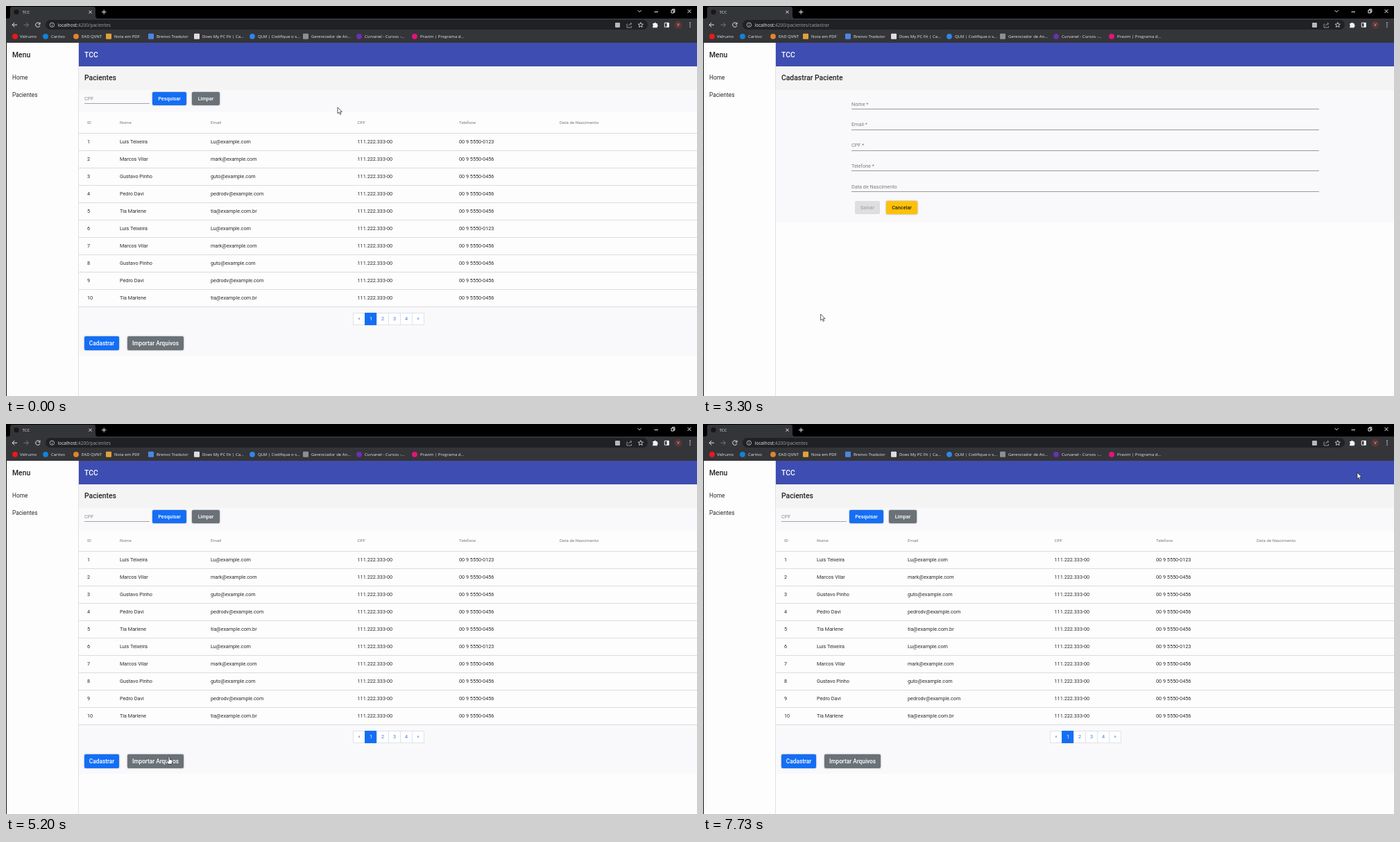
These frames come from a looping animation (996 by 562 pixels, 7900 ms). An HTML page:

```html
<!DOCTYPE html>
<html lang="pt">
<head>
<meta charset="utf-8">
<title>TCC</title>
<style>
html, body { margin: 0; width: 100%; height: 100%; overflow: hidden; background: #fdfdfd; }
svg { display: block; }
text { font-family: Roboto, sans-serif; white-space: pre; }
.ui { font-family: "Open Sans", sans-serif; }
.raised { filter: drop-shadow(0 .8px .8px rgba(0, 0, 0, .4)); }
.line { fill: none; stroke: #e8eaed; stroke-width: 1; }
</style>
</head>
<body>
<svg id="stage" width="996" height="562" viewBox="0 0 996 562"></svg>
<script>
const LOOP = 7900, LAG = 110;
const INK = '#2b2b2b', BLUE = '#146ef5', GREY = '#6a7278', CARD = '#f9f9fb';
// CSS sizes of the page, scaled to the stage
const S = { xs: 6.22, sm: 7.26, md: 8.3, lg: 10.37 };

const rect = (x, y, w, h, fill, more = '') =>
  `<rect x="${x}" y="${y}" width="${w}" height="${h}" fill="${fill}" ${more}/>`;
const dot = (x, y, r, fill) => `<circle cx="${x}" cy="${y}" r="${r}" fill="${fill}"/>`;
const path = (d, more = '') => `<path class="line" d="${d}" ${more}/>`;
const text = (x, cy, str, size, fill = INK, more = '') =>
  `<text x="${x}" y="${(cy + size * .355).toFixed(2)}" font-size="${size}" fill="${fill}" ${more}>${str}</text>`;
const ui = (x, cy, str, size, fill = '#e8eaed', more = '') =>
  text(x, cy, str, size, fill, 'class="ui" ' + more);
const rule = (x, y, w, fill = '#dcdcdf') => rect(x, y, w, 1, fill);
const MID = 'text-anchor="middle"', BOLD = 'font-weight="500"';

// Hover targets of each page
const pages = { list: [], form: [], load: [] };

function button(page, x, y, w, h, label, size, fill, hover, ink = '#fff', cls = 'raised') {
  if (hover) pages[page].push({ x, y, w, h, fill, hover, hand: true });
  const id = hover ? `id="${page}${pages[page].length - 1}"` : '';
  return `<g class="${cls}">${rect(x, y, w, h, fill, `rx="2" ${id}`)}</g>` +
    text(x + w / 2, y + h / 2 - .2, label, size, ink, `${MID} ${BOLD}`);
}

function table(page, top, cols, heads, rows) {
  let out = cols.map((x, i) => text(x, top - 15, heads[i], S.xs, '#7a7a7a')).join('');
  rows.forEach((cells, i) => {
    const y = top + i * 25;
    pages[page].push({ x: 105, y, w: 891, h: 25, fill: '#fdfdfd', hover: '#f1f1f1' });
    out += rect(105, y, 891, 25, '#fdfdfd', `id="${page}${pages[page].length - 1}"`) + rule(105, y, 891);
    out += cells.map((c, j) => text(cols[j], y + 12.2, c, S.sm)).join('');
  });
  return out + rule(105, top + rows.length * 25, 891);
}

function pager(page, x, y, labels) {
  return labels.map((s, i) => {
    const on = s === '1', px = x + i * 17;
    pages[page].push({ x: px, y, w: 17, h: 18, hand: true });
    return rect(px + .5, y + .5, 17, 17, on ? BLUE : '#fff', `stroke="${on ? BLUE : '#dee2e6'}"`) +
      text(px + 9, y + 8.5, s, S.sm, on ? '#fff' : '#3b7df0', MID);
  }).join('');
}

const header = (title, end) => rect(105, 87, 891, end - 87, CARD) +
  rect(105, 87, 891, 34, '#f4f4f4') + text(113, 103.6, title, S.lg, '#222', BOLD);

const url = tail => ui(74.5, 27.2, `localhost:<tspan fill="#9aa0a6">4200/${tail}</tspan>`, 6.6);

function browser() {
  const marks = [
    [13, 20, 'Vidrumo', '#f01818'], [57, 65, 'Cartivo', '#1283d8'],
    [101, 109, 'EAD QVNT', '#e0852c'], [148, 156, 'Nota em PDF', '#e2a03c', 1],
    [209, 217, 'Brenvo Tradutor', '#4a86e8', 1], [275, 283, 'Does My PC Fit | Ca...', '#dedede', 1],
    [355, 363, 'QLM | Codifique o s...', '#2f86eb'], [432, 440, 'Gerenciador de An...', '#8c8f94', 1],
    [509, 517, 'Curvanel - Cursos -...', '#6a2fb5'], [589, 597, 'Pravim | Programa d...', '#e6127e']
  ];
  return rect(0, 0, 996, 18, '#000') +
    `<path d="M3 18Q6 18 6 14V4Q6 1 9 1H126Q129 1 129 4V14Q129 18 132 18Z" fill="#343538"/>` +
    rect(0, 18, 996, 35, '#343538') + rect(57, 20, 868, 14, '#202124', 'rx="7"') +
    dot(15, 8.7, 3.6, '#17181a') + ui(23.5, 8.7, 'TCC', 6.1) +
    path('M119.5 6.7l4 4m0-4l-4 4M138 8.7h6.4m-3.2-3.2v6.4') +
    path('M910.7 6.2l2.5 2.5 2.5-2.5M934.5 8.5h5.5M959 6h3.5v4H959zM960.5 6V4.7h3.4V9h-1.4M982.5 5l5 5m0-5l-5 5') +
    path('M16 27.2H9m3.3-3.3L9 27.2l3.3 3.3') +
    path('M25.5 27.2h7m-3.3-3.3l3.3 3.3-3.3 3.3', 'style="stroke:#75777b"') +
    path('M48.6 25.4a3.2 3.2 0 1 0 .4 2.6M49 23.7v2.5h-2.5') +
    path('M69.6 27.2a3.2 3.2 0 1 1-6.4 0a3.2 3.2 0 1 1 6.4 0M66.4 26.8v2.3M66.4 25v.8', 'style="stroke-width:.7"') +
    rect(878, 24, 7, 7, '#b4b7bb', 'rx="1"') +
    path('M896 26h-1v5h6.5v-2M897.5 28.5q.5-3 4-3m-1.5-1.7l1.9 1.7-1.9 1.7', 'style="stroke:#a9adb2;stroke-width:.8"') +
    path('M914.8 23.6l1 2.4 2.6.2-2 1.7.7 2.6-2.3-1.4-2.3 1.4.7-2.6-2-1.7 2.6-.2z', 'style="stroke-width:.8"') +
    `<path d="M932.2 25h2a1.3 1.3 0 0 1 2.6 0h2v2a1.3 1.3 0 0 1 0 2.5v1.7h-6.6v-2a1.2 1.2 0 0 0 0-2.2z" fill="#f1f3f4"/>` +
    path('M949.3 24.3h6v6h-6z') + rect(952.5, 24, 3, 6.5, '#f1f3f4') +
    dot(969, 27.2, 5.6, '#5b3535') + ui(969, 27.2, 'V', 6, '#e5d6d6', MID) +
    [24.4, 27.2, 30].map(y => dot(986, y, .8, '#e8eaed')).join('') +
    marks.map(([x, tx, s, c, sq]) => (sq ? rect(x - 4, 39.8, 8, 8, c, 'rx="1"') : dot(x, 43.8, 3.9, c)) +
      ui(tx, 43.7, s, 6)).join('');
}

function shell() {
  return rect(0, 53, 996, 509, '#fdfdfd') + rect(0, 53, 1, 509, '#111') +
    rect(104, 53, 1, 509, '#e2e2e2') + rect(105, 53, 891, 34, '#3e4db1') +
    text(113, 70.3, 'TCC', S.lg, '#fff', BOLD) + text(9, 70.3, 'Menu', S.lg, '#222', BOLD) +
    text(9, 103.2, 'Home', S.md) + text(9, 128.2, 'Pacientes', S.md);
}

function listPage() {
  const people = [
    ['Luís Teixeira', 'Lu@example.com', '0123'], ['Marcos Vilar', 'mark@example.com', '0456'],
    ['Gustavo Pinho', 'guto@example.com', '0456'], ['Pedro Davi', 'pedrodv@example.com', '0456'],
    ['Tia Marlene', 'tia@example.com.br', '0456']
  ];
  const rows = [...people, ...people].map(([name, mail, tel], i) =>
    [i + 1, name, mail, '111.222.333-00', '00 9 5550-' + tel]);
  return url('pacientes') + header('Pacientes', 504) +
    text(113, 133, 'CPF', S.sm, '#8f8f8f') + rule(113, 140, 94, '#a5a5a5') +
    button('list', 211, 124, 49, 19, 'Pesquisar', S.sm, BLUE, '#0b5ed7') +
    button('list', 268, 124, 40, 19, 'Limpar', S.sm, GREY, '#5c636a') +
    rect(105, 153, 891, 30, '#fdfdfd') +
    table('list', 183, [117, 164, 295, 506.5, 653, 798],
      ['ID', 'Nome', 'Email', 'CPF', 'Telefone', 'Data de Nascimento'], rows) +
    pager('list', 500, 442, ['«', '1', '2', '3', '4', '»']) +
    button('list', 113, 476, 50, 20, 'Cadastrar', S.md, BLUE, '#0b5ed7') +
    button('list', 175, 476, 81, 20, 'Importar Arquivos', S.md, GREY, '#5c636a');
}

function formPage() {
  const fields = ['Nome *', 'Email *', 'CPF *', 'Telefone *', 'Data de Nascimento'];
  return url('pacientes/cadastrar') + header('Cadastrar Paciente', 312) +
    fields.map((s, i) => text(214, 141 + i * 29.8, s, S.sm, '#7d7d7d') +
      rule(214, Math.round(148 + i * 29.8), 674, '#9a9a9a')).join('') +
    button('form', 219, 281, 36, 19, 'Salvar', S.sm, '#dedede', '', '#a8a8a8', '') +
    button('form', 264, 281, 45, 19, 'Cancelar', S.sm, '#ffc107', '#ffca2c', '#222');
}

function loadPage() {
  const files = ['a14430cf-ba91-4f40-9629-a4a6214112b8', '95f70fa6-60be-4983-a854-b02fdaa265d3',
    '969eda9d-41d0-41e2-9936-df42017ffdc0', 'de8776b2-8cb1-4a52-9d6d-f17445635e47',
    '0fbb003c-22ae-4725-9617-148166c5bb88', '1af4c93a-3c15-4110-8f28-999a5d6f35e6',
    'c489950e-ae93-4a48-a70c-e6761bf55942'];
  return url('pacientes/importacao') + header('Planilhas importadas', 415) +
    rect(105.5, 128.5, 892, 19, '#fff', 'stroke="#d3d7db"') + rect(106, 129, 74, 18, '#e9ecef') +
    rect(179.5, 129, .6, 18, '#ced4da') +
    text(111.5, 138, 'Escolher ficheiro', S.md) + text(186, 138, 'Nenhum ficheiro selecionado', S.md) +
    rect(105, 156, 891, 30, '#fdfdfd') +
    table('load', 186, [117, 187.5, 792], ['ID', 'Nome', 'Data'],
      files.map((f, i) => [i + 9, f + '.xlsx', (i < 4 ? '09' : '16') + '/07/2022'])) +
    pager('load', 525, 361, ['«', '1', '»']) +
    button('load', 109, 391, 35.5, 20, 'Voltar', S.md, BLUE, '#0b5ed7', '#fff', '');
}

const stage = document.getElementById('stage');
stage.innerHTML = browser() + shell() +
  `<g id="list">${listPage()}</g><g id="form">${formPage()}</g><g id="load">${loadPage()}</g>
  <g id="cursor" fill="#fff" stroke="#1a1a1a" stroke-width=".7" stroke-linejoin="round">
  <path id="arrow" d="M0 0V9L2.1 7.1 3.6 10.4 5 9.8 3.6 6.6H6.4Z"/>
  <path id="hand" d="M-1 1a1 1 0 0 1 2 0V4.3L4 5Q5 5.4 4.8 7L4 11H-1.2L-3.6 7.2Q-3.5 5.8-2.2 6.2L-1 7.2Z"/></g>`;

const $ = id => document.getElementById(id);
for (const name in pages) pages[name].forEach((p, i) => { p.el = $(name + i); });

// Pointer path: time, x, y
const track = [
  [0, 478, 146], [150, 478, 146], [450, 430, 225], [900, 104, 271], [1130, 104, 271],
  [1600, 190, 288], [2030, 190, 288], [2500, 186, 390], [2800, 150, 464], [2960, 140, 482],
  [3120, 140, 482], [3600, 250, 340], [4000, 286, 291], [4520, 286, 291], [5100, 238, 455],
  [5200, 235, 479], [5300, 233, 485], [5520, 233, 485], [5960, 234, 422], [6100, 234, 422],
  [6350, 210, 428], [6760, 130, 402], [6960, 130, 402], [7600, 938, 79], [7730, 943, 70], [LOOP, 943, 70]
];
const scenes = [[0, 'list'], [3080, 'form'], [4480, 'list'], [5480, 'load'], [6920, 'list']];

const slope = (i, k) => track[i + 1] ? (track[i + 1][k] - track[i][k]) / (track[i + 1][0] - track[i][0]) : 0;
function tangent(i, k) {
  const a = i ? slope(i - 1, k) : 0, b = slope(i, k);
  return a * b > 0 ? 2 * a * b / (a + b) : 0;
}
// Monotone cubic through the track
function pointer(t) {
  let i = 0;
  while (i < track.length - 2 && t >= track[i + 1][0]) i++;
  const d = track[i + 1][0] - track[i][0], u = Math.max(0, (t - track[i][0]) / d), v = 1 - u;
  return [1, 2].map(k => track[i][k] * v * v * (1 + 2 * u) + track[i + 1][k] * u * u * (3 - 2 * u) +
    d * u * v * (tangent(i, k) * v - tangent(i + 1, k) * u));
}
const inside = (p, [x, y]) => x >= p.x && x < p.x + p.w && y >= p.y && y < p.y + p.h;

function draw(t) {
  const page = scenes.filter(s => s[0] <= t).pop()[1];
  for (const name in pages) $(name).style.display = name === page ? '' : 'none';
  const now = pointer(t), late = pointer(t - LAG);
  for (const p of pages[page])
    if (p.hover) p.el.setAttribute('fill', inside(p, late) ? p.hover : p.fill);
  const hand = pages[page].some(p => p.hand && inside(p, now));
  $('arrow').style.display = hand ? 'none' : '';
  $('hand').style.display = hand ? '' : 'none';
  $('cursor').setAttribute('transform', `translate(${now[0].toFixed(1)} ${now[1].toFixed(1)})`);
}

const start = performance.now();
function tick() {
  draw((performance.now() - start) % LOOP);
  requestAnimationFrame(tick);
}
tick();
</script>
</body>
</html>
```
